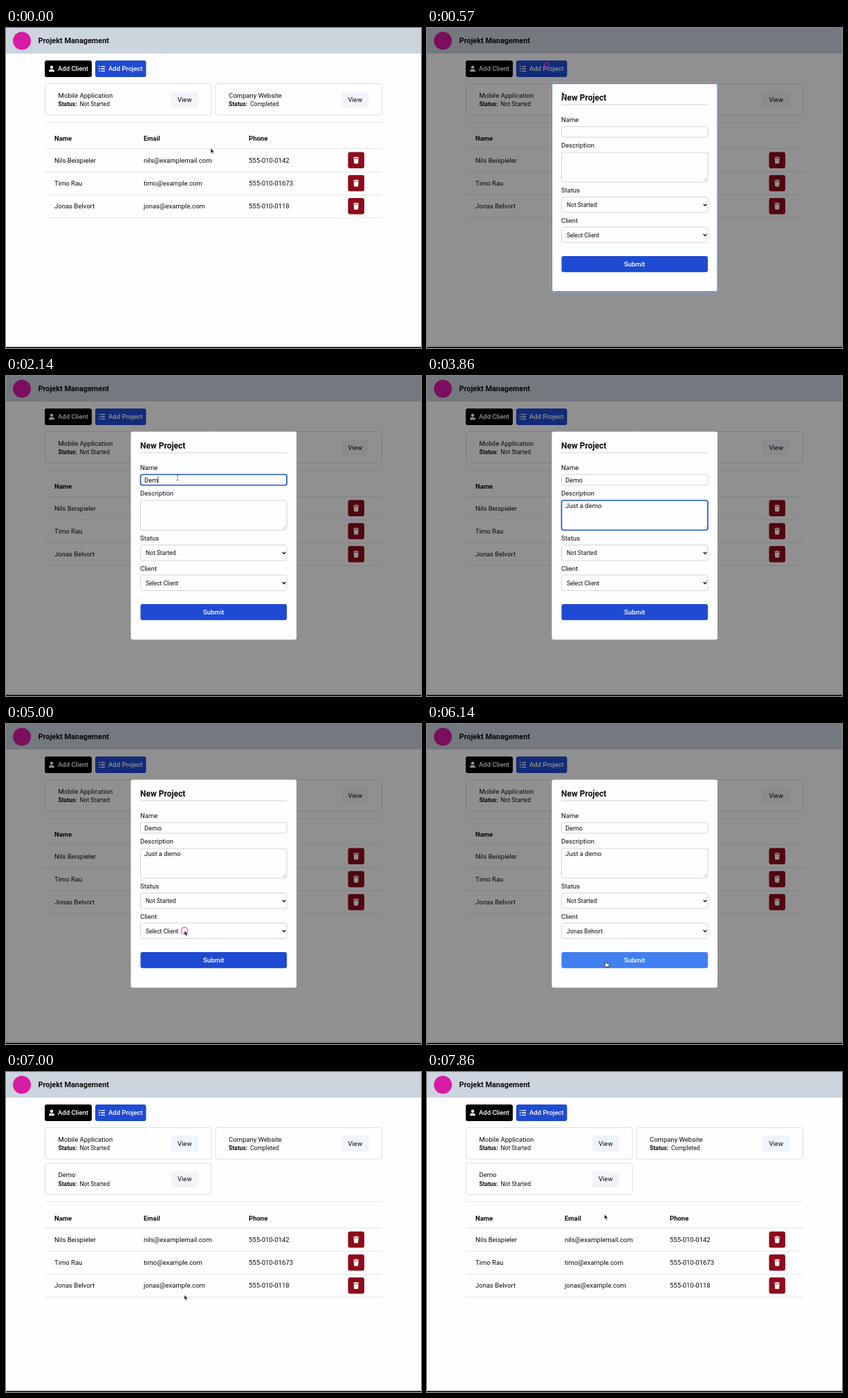
Animation, 600 px wide and 463 px high, one loop 8000 ms. Source, as an HTML page:

```html
<!DOCTYPE html>
<html lang="de">
<head>
<meta charset="utf-8">
<title>Projekt Management</title>
<style>
  html, body { margin: 0; width: 100%; height: 100%; overflow: hidden; background: #fefdff; }
  svg { display: block; width: 100vw; height: 100vh; }
  text { font: 9.5px Roboto, Arial, sans-serif; fill: #0c0c0e; white-space: pre; }
  .bold { font-weight: 700; }
  .medium { font-weight: 500; }
  .light { fill: #fefdff; }
  .small { font-size: 8.5px; }
  .title { font-size: 10.9px; }
  .heading { font-size: 12px; }
  .line { stroke: #e3e6ea; }
  .field { fill: #fefdff; stroke: #d5d6db; }
  .focus { stroke: #2456c4; stroke-width: 1.7; }
</style>
</head>
<body>
<svg id="stage" viewBox="0 0 600 463" preserveAspectRatio="none">
  <defs>
    <g id="trash" fill="#fefdff">
      <path d="M-4-4.2h2.2l.6-.8h2.4l.6.8H4v1.2h-8z"/>
      <path d="M-3.5-2.3h7L3 4q-.1 1-1 1h-4q-.9 0-1-1z"/>
    </g>
    <g id="person" fill="#fefdff">
      <circle cy="-2.2" r="2.2"/>
      <path d="M-4 4.3Q-4 .7-1.5.7h3Q4 .7 4 4.3z"/>
    </g>
    <g id="list" stroke="#fefdff" stroke-width="1.3">
      <path d="M-4.6-3.3h1.8M-4.6 0h1.8M-4.6 3.3h1.8M-1.4-3.3h6M-1.4 0h6M-1.4 3.3h6"/>
    </g>
    <path id="chevron" d="M-2.2-1.2L0 1.2 2.2-1.2" fill="none" stroke="#111" stroke-width="1.4"/>
    <path id="arrow" d="M0 0v7.2l1.7-1.5 1.2 2.7 1.3-.6L3 5.2h2.3z"
      fill="#161616" stroke="#fff" stroke-width=".6"/>
    <path id="beam" d="M-1.8-4.2Q0-4.2 0-3Q0-4.2 1.8-4.2M0-3v6M-1.8 4.2Q0 4.2 0 3Q0 4.2 1.8 4.2"
      fill="none" stroke="#555" stroke-width=".9" stroke-dasharray="1.6 .7"/>
    <path id="hand" d="M-.9 0Q0-1 .9 0V3l3 .8q1.2.3 1 1.6L4.3 8.6h-4L-2.4 5.2q-.2-1.2 1.5-.2z"
      fill="#fff" stroke="#222" stroke-width=".9" stroke-linejoin="round"/>
  </defs>
</svg>
<script>
const stage = document.getElementById('stage');
const PAPER = '#fefdff', BLUE = '#1f4bd3', HOVER_BLUE = '#4080f0';

function add(parent, tag, attrs = {}, content = '') {
  const node = document.createElementNS('http://www.w3.org/2000/svg', tag);
  for (const key in attrs) node.setAttribute(key, attrs[key]);
  node.textContent = content;
  parent.append(node);
  return node;
}
const group = parent => add(parent, 'g');
const box = (parent, x, y, width, height, attrs) =>
  add(parent, 'rect', { x, y, width, height, rx: 3, ...attrs });
// y is the middle of the capitals
const label = (parent, x, y, content, style = '') =>
  add(parent, 'text', { x, y: y + 3.4, class: style }, content);
const icon = (parent, name, x, y) =>
  add(parent, 'use', { href: '#' + name, transform: `translate(${x} ${y})` });
const rule = (parent, x1, x2, y) =>
  add(parent, 'line', { x1, x2, y1: y, y2: y, class: 'line' });
const show = (node, visible) => node.setAttribute('visibility', visible ? 'visible' : 'hidden');

function projectCard(parent, x, y, name, status) {
  box(parent, x + .5, y + .5, 240.5, 45.5, { fill: PAPER, stroke: '#d5e1e8' });
  label(parent, x + 19.5, y + 17.5, name);
  label(parent, x + 19.5, y + 30, 'Status:', 'small bold');
  label(parent, x + 50.5, y + 30, status, 'small');
  box(parent, x + 182.5, y + 12, 39.5, 23, { fill: '#f1f4f8' });
  label(parent, x + 192, y + 23.5, 'View');
}

// Page
const page = group(stage);
box(page, 0, 0, 600, 463, { rx: 0, fill: PAPER });
box(page, 0, 0, 600, 37, { rx: 0, fill: '#ccd4de' });
add(page, 'circle', { cx: 23, cy: 18.5, r: 13, fill: '#d81ba5' });
label(page, 46.5, 18.5, 'Projekt Management', 'title bold');
box(page, 56, 47, 68, 24, { fill: '#000' });
icon(page, 'person', 66, 59);
label(page, 75, 59, 'Add Client', 'light medium');
box(page, 129, 47, 73.5, 24, { fill: BLUE });
icon(page, 'list', 138.5, 59);
label(page, 148, 59, 'Add Project', 'light medium');
projectCard(page, 56, 80, 'Mobile Application', 'Not Started');
projectCard(page, 302.5, 80, 'Company Website', 'Completed');
const newCard = group(page);
projectCard(newCard, 56, 131.5, 'Demo', 'Not Started');

const clients = group(page);
rule(clients, 56, 544, 136.5);
label(clients, 70, 160, 'Name', 'bold');
label(clients, 199, 160, 'Email', 'bold');
label(clients, 351, 160, 'Phone', 'bold');
rule(clients, 56, 544, 174.5);
[
  ['Nils Beispieler', 'nils@examplemail.com', '555-010-0142'],
  ['Timo Rau', 'timo@example.com', '555-010-01673'],
  ['Jonas Belvort', 'jonas@example.com', '555-010-0118']
].forEach(([name, email, phone], i) => {
  const y = 191.3 + i * 33.25;
  label(clients, 70, y, name);
  label(clients, 199, y, email);
  label(clients, 351, y, phone);
  box(clients, 494.5, y - 11.8, 23.5, 23.5, { fill: '#8e0b1b' });
  icon(clients, 'trash', 506.2, y);
  rule(clients, 56, 544, y + 16.8);
});

// Dialog
const dialog = group(stage);
box(dialog, 0, 0, 600, 463, { rx: 0, fill: '#000', opacity: .43 });
const halo = box(dialog, 179.5, 79.5, 241.5, 303, { rx: 4, fill: '#a9cdf2' });
const frame = box(dialog, 180.5, 80.5, 239.5, 301, { fill: PAPER });
label(dialog, 194, 102, 'New Project', 'heading bold');
rule(dialog, 194, 406, 111).style.stroke = '#d3d2d6';
label(dialog, 194, 132.5, 'Name');
label(dialog, 194, 170, 'Description');
label(dialog, 194, 235, 'Status');
label(dialog, 194, 279, 'Client');
const field = (y, height) => box(dialog, 194.5, y, 211.5, height, { class: 'field' });
const nameField = field(142.5, 15.5);
const textField = field(180, 43);
field(244.5, 22.5);
field(288, 22.5);
add(dialog, 'path', { d: 'M400 221.5l4.5-4.5M402.5 221.5l2-2', stroke: '#999', 'stroke-width': .7 });
const nameText = label(dialog, 200, 150.3, '');
const descriptionText = label(dialog, 200, 187.5, '');
const caret = add(dialog, 'line', { y1: 145.5, y2: 155, stroke: '#111', 'stroke-width': .8 });
label(dialog, 202, 256, 'Not Started', 'small');
const clientText = label(dialog, 202, 299.5, '', 'small');
icon(dialog, 'chevron', 402, 256);
icon(dialog, 'chevron', 402, 299.5);
const submit = box(dialog, 194.5, 330, 211.5, 23.3, {});
label(dialog, 285, 341.7, 'Submit', 'light medium');

// Pointer
const ring = add(stage, 'circle', { fill: 'none', stroke: '#d81b98', 'stroke-width': 1.2 });
const pointer = add(stage, 'use');
box(stage, 0, 461.5, 600, 1.5, { rx: 0, fill: '#000' });

// All times below are in ticks of 1/7 second
const LOOP = 8000, RATE = 7;
const OPEN = 4, FOCUS_NAME = 9, FOCUS_TEXT = 18, BLUR = 33, PICK = 36, CLOSE = 44, SAVED = 46;
const clicks = [[3, 173, 54], [FOCUS_NAME, 248, 147], [BLUR, 258, 299], [CLOSE, 258, 342]];
const typedName = [[0, 0], [12, 1], [13, 2], [15, 3], [16, 4]];
const typedText = [[0, 0], [19, 1], [20, 2], [21, 3], [23, 5], [25, 7], [26, 9], [27, 11]];
const path = [
  [0, 296, 174, 'arrow'], [2, 215, 95, 'arrow'], [3, 172, 54, 'hand'],
  [4, 195, 92, 'arrow'], [5, 258, 156, 'beam'], [8, 248, 147, 'beam'],
  [FOCUS_TEXT, 248, 147, ''], [28, 250, 215, 'beam'], [29, 252, 240, 'arrow'],
  [32, 258, 299, 'arrow'], [40, 258, 299, 'arrow'], [42, 259, 338, 'hand'],
  [43, 258.5, 343, 'hand'], [45, 258.5, 343, 'arrow'], [48, 258, 342, 'arrow'],
  [55, 256.5, 206, 'arrow']
];
const lastStep = (steps, tick) => steps.filter(step => step[0] <= tick).pop();

function movePointer(tick) {
  const from = lastStep(path, tick);
  const to = path[path.indexOf(from) + 1] || from;
  const part = to === from ? 0 : (tick - from[0]) / (to[0] - from[0]);
  const at = i => from[i] + (to[i] - from[i]) * part;
  show(pointer, from[3]);
  pointer.setAttribute('href', '#' + from[3]);
  pointer.setAttribute('transform', `translate(${at(1)} ${at(2)})`);
}

function drawRing(tick) {
  const click = lastStep(clicks, tick);
  const age = click ? tick - click[0] : 9;
  show(ring, age < 3);
  if (age > 2) return;
  ring.setAttribute('cx', click[1]);
  ring.setAttribute('cy', click[2]);
  ring.setAttribute('r', 2.4 + age * 1.2);
  ring.setAttribute('opacity', 1 - age * .15);
}

function drawDialog(tick) {
  const inName = tick >= FOCUS_NAME && tick < FOCUS_TEXT;
  const inText = tick >= FOCUS_TEXT && tick < BLUR;
  const outlined = tick < FOCUS_NAME;
  dialog.setAttribute('display', tick >= OPEN && tick < CLOSE ? 'inline' : 'none');
  halo.setAttribute('display', outlined ? 'inline' : 'none');
  frame.setAttribute('stroke', outlined ? '#2f6fc8' : 'none');
  nameField.classList.toggle('focus', inName);
  textField.classList.toggle('focus', inText);
  nameText.textContent = 'Demo'.slice(0, lastStep(typedName, tick)[1]);
  descriptionText.textContent = 'Just a demo'.slice(0, lastStep(typedText, tick)[1]);
  clientText.textContent = tick < PICK ? 'Select Client' : 'Jonas Belvort';
  submit.setAttribute('fill', tick > 40 ? HOVER_BLUE : BLUE);
  caret.setAttribute('display', inName ? 'inline' : 'none');
  const x = 200.4 + nameText.getComputedTextLength();
  caret.setAttribute('x1', x);
  caret.setAttribute('x2', x);
}

let shown = -1;
const start = performance.now();
function draw() {
  const time = (performance.now() - start) % LOOP;
  const tick = Math.min(55, Math.floor((time + 5) * RATE / 1000));
  if (tick !== shown) {
    shown = tick;
    const saved = tick >= SAVED;
    newCard.setAttribute('display', saved ? 'inline' : 'none');
    clients.setAttribute('transform', `translate(0 ${saved ? 51.2 : 0})`);
    drawDialog(tick);
    drawRing(tick);
    movePointer(tick);
  }
  requestAnimationFrame(draw);
}
draw();
</script>
</body>
</html>
```
